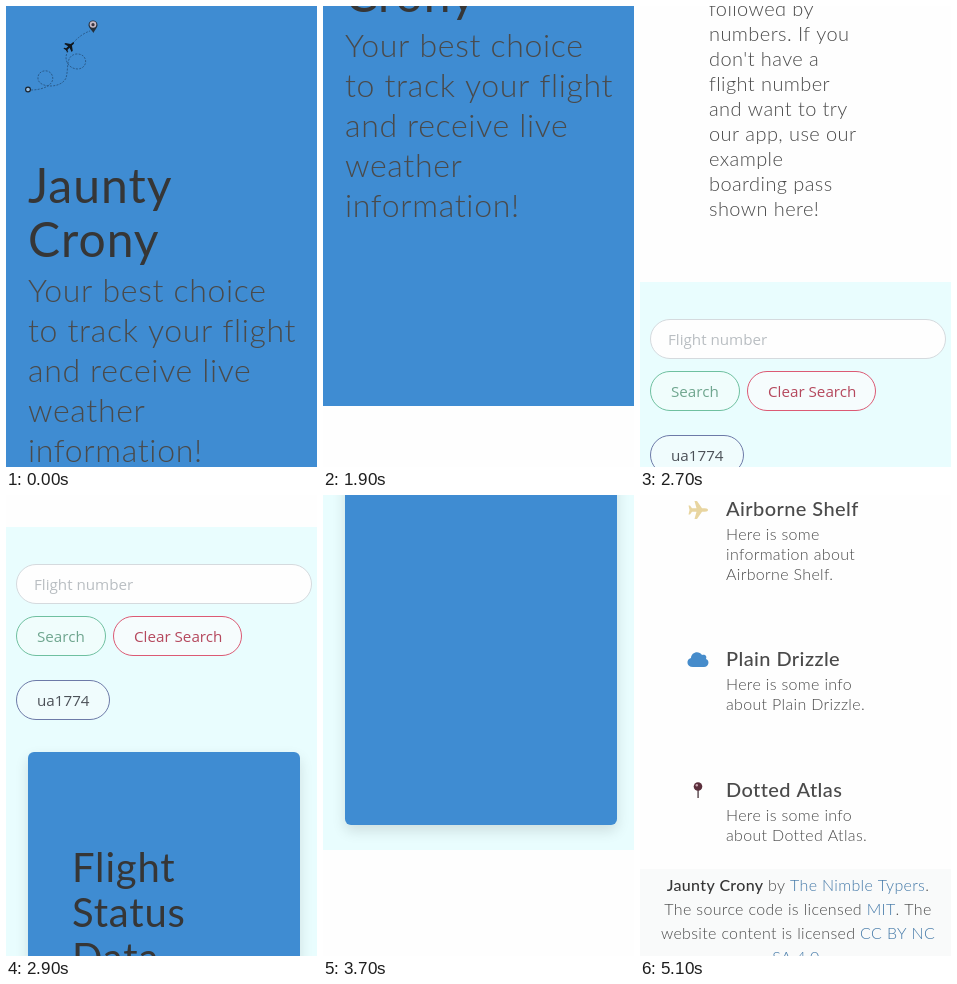
These frames come from a looping animation (311x461 px, 5900 ms). An HTML page with a canvas:

```html
<!DOCTYPE html>
<html lang="en">
<head>
<meta charset="utf-8">
<title>Flight page</title>
<style>
  html, body { margin: 0; width: 100%; height: 100%; overflow: hidden; background: #fefefe; }
  canvas { display: block; width: 311px; height: 461px; }
</style>
</head>
<body>
<canvas id="stage" width="311" height="461"></canvas>
<script>
const W = 311, H = 461, LOOP = 5900;
const ctx = document.getElementById('stage').getContext('2d');
const BLUE = '#3f8cd2', CYAN = '#e9fdfe', DARK = '#363636', BODY = '#4a4a4a', LINK = '#4479a8';
const ROUND = 'Lato, sans-serif', UI = '"Open Sans", sans-serif';

function setFont(size, weight, family = ROUND) {
  ctx.font = `${weight} ${size}px ${family}`;
  ctx.letterSpacing = (family === ROUND ? size * 0.021 : 0) + 'px';
}

function lines(list, x, y, step, size, weight, color) {
  setFont(size, weight);
  ctx.fillStyle = color;
  list.forEach((s, i) => ctx.fillText(s, x, y + i * step));
}

function label(s, x, y, color) {
  setFont(15.2, 400, UI);
  ctx.fillStyle = color;
  ctx.fillText(s, x, y);
}

// A centred line made of [text, color, weight] runs
function centred(runs, y) {
  const widths = runs.map(([s, , weight]) => {
    setFont(16, weight);
    return ctx.measureText(s).width;
  });
  let x = 158 - widths.reduce((a, b) => a + b, 0) / 2;
  runs.forEach(([s, color, weight], i) => {
    setFont(16, weight);
    ctx.fillStyle = color;
    ctx.fillText(s, x, y);
    x += widths[i];
  });
}

function rect(x, y, w, h, color) {
  ctx.fillStyle = color;
  ctx.fillRect(x, y, w, h);
}

function box(x, y, w, h, r, fill, stroke) {
  ctx.beginPath();
  ctx.roundRect(x, y, w, h, r);
  ctx.fillStyle = fill;
  ctx.fill();
  if (stroke) {
    ctx.strokeStyle = stroke;
    ctx.lineWidth = 1;
    ctx.stroke();
  }
}

function dot(x, y, r, fill) {
  ctx.beginPath();
  ctx.arc(x, y, r, 0, Math.PI * 2);
  ctx.fillStyle = fill;
  ctx.fill();
}

function ring(x, y, r, width, color) {
  ctx.beginPath();
  ctx.arc(x, y, r, 0, Math.PI * 2);
  ctx.strokeStyle = color;
  ctx.lineWidth = width;
  ctx.stroke();
}

// Places a block of the page; its coordinates start at the given height
function block(top, scroll, draw) {
  ctx.save();
  ctx.translate(0, top - scroll);
  draw();
  ctx.restore();
}

const planeShape = new Path2D('M10 0C10 -1.5 8 -1.7 4 -1.7L-1 -9H-3.5L-1.5 -1.7H-6L-8 -4.5H-9.5L-8.5 0L-9.5 4.5H-8L-6 1.7H-1.5L-3.5 9H-1L4 1.7C8 1.7 10 1.5 10 0Z');
const cloudShape = new Path2D('M53 172C46 172 46 164 51 163C51 157 59 155 62 160C66 159 67 162 66 164C70 165 69 172 64 172Z');
const route = new Path2D('M25 84C38 84 50 78 46 69C43 62 31 64 32 73C33 82 55 83 60 72C63 62 59 50 70 48C82 47 83 62 72 63C62 63 57 53 62 45M67 37Q75 28 84 25');
const pinShape = new Path2D('M82.5 19C82.5 13 91.5 13 91.5 19C91.5 22 88.5 24 87.5 27C86 24 82.5 22 82.5 19Z');

function plane(x, y, angle, scale, color) {
  ctx.save();
  ctx.translate(x, y);
  ctx.rotate(angle);
  ctx.scale(scale, scale);
  ctx.fillStyle = color;
  ctx.fill(planeShape);
  ctx.restore();
}

function hero() {
  rect(0, 0, W, 645, BLUE);
  ctx.strokeStyle = '#25507a';
  ctx.lineWidth = 0.8;
  ctx.setLineDash([2, 1.3]);
  ctx.stroke(route);
  ctx.setLineDash([]);
  dot(22, 83.5, 2.6, '#9fc3e4');
  ring(22, 83.5, 2.4, 1.2, '#1a2530');
  plane(63.5, 40.5, -0.75, 0.6, '#10161c');
  ctx.fillStyle = '#25303c';
  ctx.fill(pinShape);
  dot(87, 18.5, 3.3, '#c9bcc8');
  dot(87, 18.7, 1.6, '#3a3540');
  lines(['Jaunty', 'Crony'], 22, 197, 54, 48, 400, DARK);
  lines(['Your best choice', 'to track your flight', 'and receive live', 'weather', 'information!'],
    22, 296, 40, 32, 300, BODY);
}

function boardingPass() {
  rect(10, 7, 35, 35, '#4a92d2');
  rect(12, 9, 31, 31, '#fdfdfd');
  rect(20, 11, 15, 1, '#a9c9e8');
  setFont(4, 800, UI);
  ctx.fillStyle = '#222';
  ctx.fillText('GDN', 15, 18);
  ctx.fillText('LHR', 31, 18);
  plane(27.5, 16.3, 0, 0.2, '#333');
  for (let i = 0; i < 3; i++) {
    rect(14, 22 + i * 6, 11, 1, '#a4a8ad');
    rect(29, 22 + i * 6, 11, 1, '#a4a8ad');
    rect(14, 24 + i * 6, 8, 1, '#555');
    rect(32, 24 + i * 6, 7, 1, '#666');
  }
  ring(17.5, 28.5, 5, 1, '#5d6268');
}

function welcome() {
  box(256.5, -12.5, 58, 42, 21, '#fefefe', '#e2e4ea');
  dot(285, 9, 8, '#438dcc');
  rect(284, 8, 2.2, 5, '#fff');
  rect(283, 8, 2, 1.3, '#fff');
  rect(282.8, 12, 4.6, 1.4, '#fff');
  dot(285, 5.3, 1.3, '#fff');
  boardingPass();
  lines(['Welcome', 'to Jaunty', 'Crony!'], 69, 74, 36, 32, 400, DARK);
  lines(['Every boarding', 'pass has a flight', 'number on it. To', 'find your flight', 'number, look at',
    'your boarding', 'pass or digital', 'boarding pass.', 'The flight', 'number will be', 'listed as "Flight"',
    'and will begin', 'with 2-3 letters', 'followed by', 'numbers. If you', "don't have a", 'flight number',
    'and want to try', 'our app, use our', 'example', 'boarding pass', 'shown here!'],
    69, 174, 25, 20, 300, BODY);
}

function search() {
  rect(0, 276, W, 1301, CYAN);
  box(10.5, 313.5, 295, 39, 19.5, '#fefefe', '#d5dade');
  label('Flight number', 28, 339, '#b9bec2');
  box(10.5, 365.5, 89, 39, 19.5, '#f0fdfc', '#6fc0a0');
  label('Search', 31, 391, '#6fa68f');
  box(107.5, 365.5, 128, 39, 19.5, '#f6fcfd', '#dc5a74');
  label('Clear Search', 128, 391, '#b5485d');
  box(10.5, 429.5, 93, 39, 19.5, '#f0fcfd', '#6d7aa8');
  label('ua1774', 31, 455, '#4c5158');
}

function card(top, height) {
  ctx.save();
  ctx.shadowColor = 'rgba(10, 10, 10, 0.12)';
  ctx.shadowBlur = 14;
  ctx.shadowOffsetY = 6;
  box(22, top, 272, height, 6, BLUE);
  ctx.restore();
}

function status() {
  card(-110, 519);
  card(433, 508);
  lines(['Flight', 'Status', 'Data'], 66, 20, 45, 40, 400, DARK);
  lines(['This is the most', 'updated', 'information about', 'your flight:'], 66, 140, 25, 20, 300, BODY);
}

function credits() {
  const item = (y, title, text) => {
    lines([title], 86, y, 0, 20, 500, BODY);
    lines(text, 86, y + 24, 20, 16, 300, BODY);
  };
  plane(58, 15, 0, 1, '#e8d5a0');
  item(21, 'Airborne Shelf', ['Here is some', 'information about', 'Airborne Shelf.']);
  ctx.fillStyle = '#468ccb';
  ctx.fill(cloudShape);
  item(171, 'Plain Drizzle', ['Here is some info', 'about Plain Drizzle.']);
  rect(57.3, 294, 1.6, 9, '#6b5c62');
  dot(58, 291.5, 4.3, '#5b2f3c');
  dot(56.8, 290.3, 1.2, '#c9a4ae');
  item(302, 'Dotted Atlas', ['Here is some info', 'about Dotted Atlas.']);

  rect(0, 374, W, 120, '#f9fafa');
  centred([['Jaunty Crony', DARK, 500], [' by ', BODY, 300], ['The Nimble Typers', LINK, 300], ['.', BODY, 300]], 396);
  centred([['The source code is licensed ', BODY, 300], ['MIT', LINK, 300], ['. The', BODY, 300]], 420);
  centred([['website content is licensed ', BODY, 300], ['CC BY NC', LINK, 300]], 444);
  centred([['SA 4.0', LINK, 300], ['.', BODY, 300]], 468);
}

// Steady scroll in tenths of a second, then rest at the bottom
function scrollAt(t) {
  const step = Math.min(24, Math.max(0, Math.floor(t / 100) - 17));
  return Math.round(step * 122.25);
}

function render(t) {
  const y = scrollAt(t);
  rect(0, 0, W, H, '#fefefe');
  block(0, y, hero);
  block(734, y, welcome);
  block(1223, y, search);
  block(1834, y, status);
  block(2934, y, credits);
}

const start = performance.now();
function tick() {
  render((performance.now() - start) % LOOP);
  requestAnimationFrame(tick);
}
tick();
</script>
</body>
</html>
```
